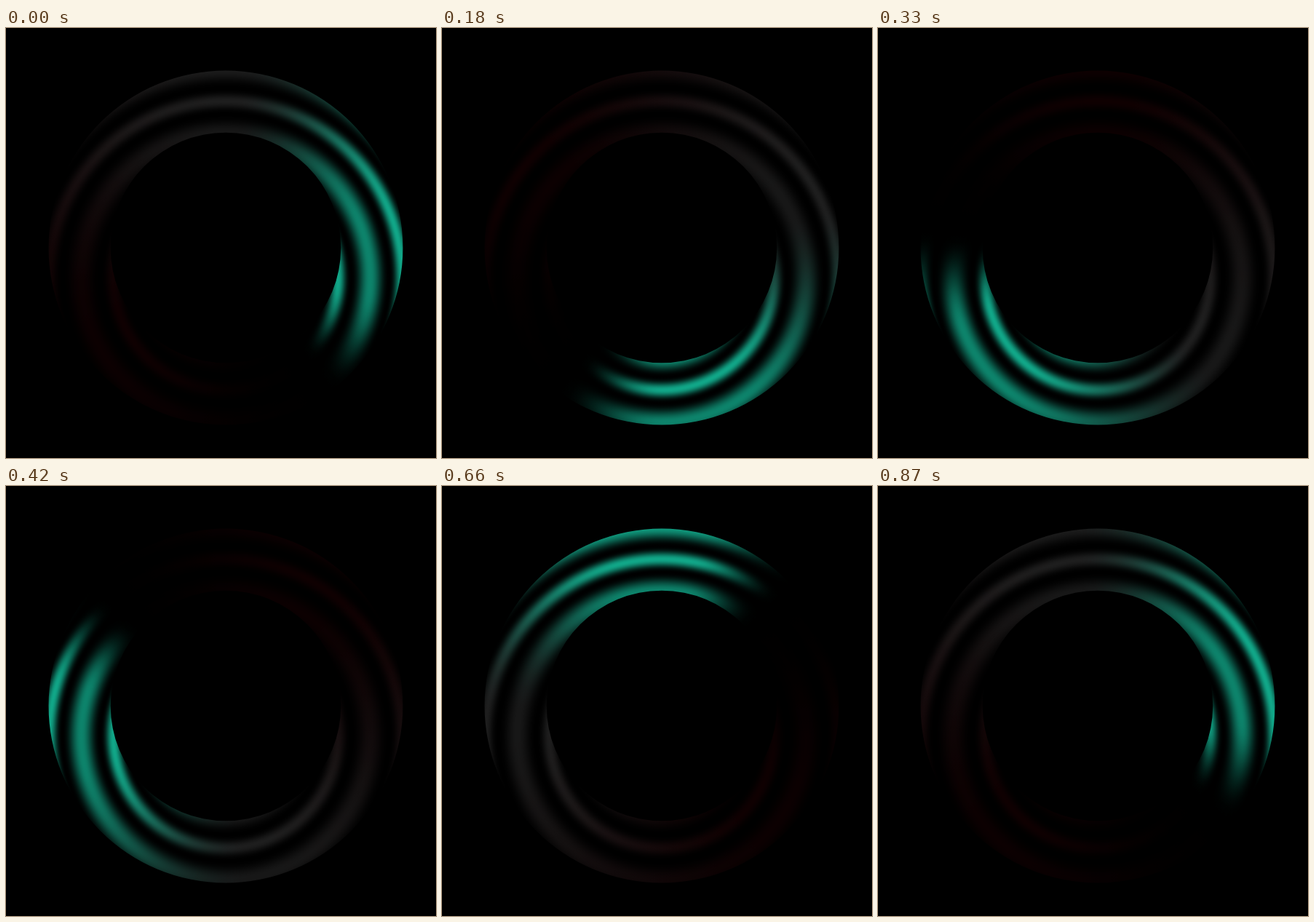
An HTML page with a canvas for the animation above (0.9 s loop, 591 by 591 pixels).

```html
<!DOCTYPE html>
<html lang="en">
<head>
<meta charset="utf-8">
<title>Glowing ring loader</title>
<style>
  html, body { margin: 0; width: 100%; height: 100%; overflow: hidden; background: #000; }
  canvas { display: block; }
</style>
</head>
<body>
<canvas id="stage" width="591" height="591"></canvas>
<script>
const ctx = document.getElementById('stage').getContext('2d');
const SIZE = 591, LOOP = 900, STEP = 30;
const C = 302, INNER = 158.3, OUTER = 243.5;
const SHADE_Y = C + 41, SHADE_R = 300;
const START = 53;

const BLACK = [0, 0, 0], TEAL = [17, 168, 137], GREY = [30, 30, 30], RED = [15, 0, 1];

// Key colours by degrees behind the leading edge
const trail = [[0, BLACK], [36, TEAL], [60, TEAL], [140, GREY], [270, RED], [360, BLACK]];

const ease = x => (1 - Math.cos(Math.PI * x)) / 2;
const rgb = c => `rgb(${c.map(Math.round).join(',')})`;

function trailColor(behind) {
  const i = Math.max(1, trail.findIndex(key => behind <= key[0]));
  const [a, from] = trail[i - 1], [b, to] = trail[i];
  const k = ease((behind - a) / (b - a));
  return from.map((v, j) => v + (to[j] - v) * k);
}

// Thin bright lines alternate with wide soft bands, dark in between
function brightness(r) {
  const u = (r - 154.5) / 88;
  const wave = Math.cos(2 * Math.PI * u) - 0.25;
  if (wave > 0) return (wave / 0.75) ** 3;
  return (0.78 + 0.15 * Math.abs(u - 0.5)) * (wave / 1.25) ** 2;
}

const ring = new Path2D();
ring.arc(C, C, OUTER, 0, Math.PI * 2);
ring.moveTo(C + INNER, C);
ring.arc(C, C, INNER, 0, Math.PI * 2);

const shade = ctx.createRadialGradient(C, SHADE_Y, 0, C, SHADE_Y, SHADE_R);
for (let r = 100; r <= SHADE_R; r += 2) {
  const v = brightness(r) * 255;
  shade.addColorStop(r / SHADE_R, rgb([v, v, v]));
}

function sweep(degrees) {
  const g = ctx.createConicGradient(degrees * Math.PI / 180, C, C);
  for (let a = 0; a <= 360; a += 3) g.addColorStop(a / 360, rgb(trailColor(360 - a)));
  return g;
}

function draw(ms) {
  const t = Math.floor((ms % LOOP) / STEP) * STEP;
  ctx.globalCompositeOperation = 'source-over';
  ctx.fillStyle = '#000';
  ctx.fillRect(0, 0, SIZE, SIZE);
  ctx.fillStyle = sweep((START + t / LOOP * 360) % 360);
  ctx.fill(ring, 'evenodd');
  ctx.globalCompositeOperation = 'multiply';
  ctx.fillStyle = shade;
  ctx.fillRect(0, 0, SIZE, SIZE);
}

function tick() {
  draw(performance.now());
  requestAnimationFrame(tick);
}
tick();
</script>
</body>
</html>
```
